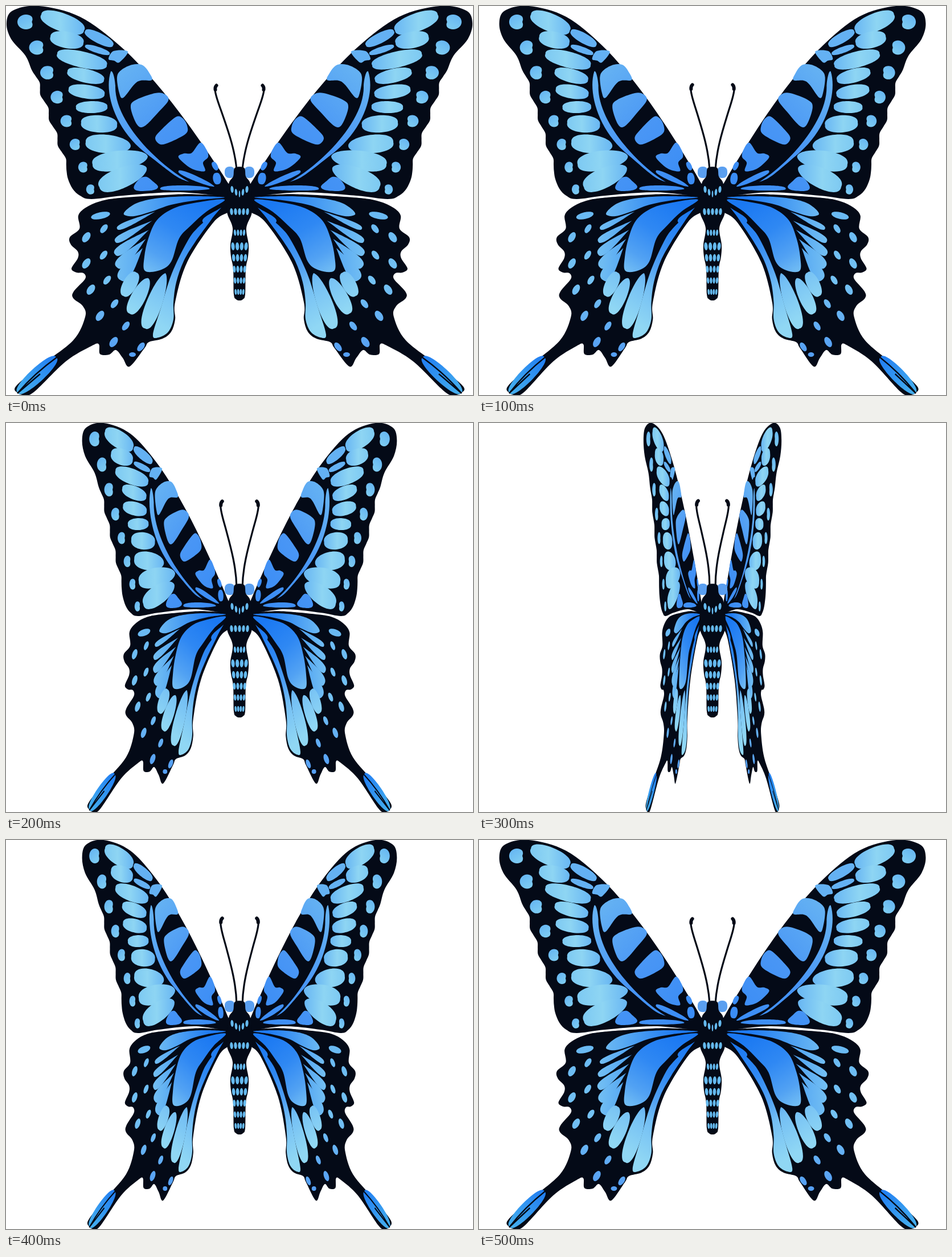
These frames come from a looping animation (820x683 px, 0.6 s). An HTML page:

```html
<!DOCTYPE html>
<html lang="en">
<head>
<meta charset="utf-8">
<title>Butterfly</title>
<style>
  html, body { margin: 0; width: 100%; height: 100%; overflow: hidden; background: #fff; }
  svg { display: block; width: 100%; height: 100%; }
</style>
</head>
<body>
<svg viewBox="0 0 820 683">
  <defs>
    <linearGradient id="pale">
      <stop offset="0" stop-color="#7dc9f2"/>
      <stop offset=".45" stop-color="#8ed5f3"/>
      <stop offset="1" stop-color="#68b6f3"/>
    </linearGradient>
    <linearGradient id="edge" x2=".6" y2="1">
      <stop offset="0" stop-color="#63b3f2"/>
      <stop offset="1" stop-color="#7dcbf2"/>
    </linearGradient>
    <linearGradient id="inner" gradientUnits="userSpaceOnUse" x1="375" y1="300" x2="205" y2="115">
      <stop offset="0" stop-color="#3a8cf5"/>
      <stop offset=".5" stop-color="#4996f5"/>
      <stop offset="1" stop-color="#64b1f3"/>
    </linearGradient>
    <linearGradient id="fan" gradientUnits="userSpaceOnUse" x1="350" y1="345" x2="235" y2="540">
      <stop offset="0" stop-color="#1a78f2"/>
      <stop offset=".3" stop-color="#2f88f3"/>
      <stop offset=".54" stop-color="#52a2f3"/>
      <stop offset=".7" stop-color="#74bff4"/>
      <stop offset="1" stop-color="#90d7f4"/>
    </linearGradient>
    <linearGradient id="brow" gradientUnits="userSpaceOnUse" x1="190" y1="0" x2="340" y2="0">
      <stop offset="0" stop-color="#74c0f3"/>
      <stop offset="1" stop-color="#1f7bf2"/>
    </linearGradient>
    <linearGradient id="spot" gradientUnits="userSpaceOnUse" x1="0" y1="360" x2="0" y2="610">
      <stop offset="0" stop-color="#69b9f3"/>
      <stop offset=".5" stop-color="#74c2f3"/>
      <stop offset="1" stop-color="#559ff4"/>
    </linearGradient>
    <linearGradient id="tail" x1="1" y1="0" x2="0" y2="1">
      <stop offset="0" stop-color="#1f7bf2"/>
      <stop offset="1" stop-color="#47b2ee"/>
    </linearGradient>
  </defs>
  <g id="half">
    <g class="wing" id="hind"></g>
    <g class="wing" id="fore"></g>
    <g id="antenna" fill="none" stroke="#040a17" stroke-linecap="round">
      <path stroke-width="3.2" d="M405 287C402 254 391 222 382 196C374 172 367 157 367 146"/>
      <path stroke-width="6" d="M367.5 147C367 143 368 141 369.5 139.5"/>
    </g>
    <rect x="384" y="282" width="18" height="20" rx="8" fill="#5a9ff0"/>
  </g>
  <use href="#half" transform="translate(820) scale(-1 1)"/>
  <g id="body"></g>
</svg>
<script>
const INK = '#040a17';
const $ = id => document.getElementById(id);
const times = (n, f) => Array.from({ length: n }, (_, i) => f(i));

function add(parent, tag, attrs) {
  const el = document.createElementNS('http://www.w3.org/2000/svg', tag);
  for (const k in attrs) el.setAttribute(k, attrs[k]);
  return parent.appendChild(el);
}

const points = text => text.trim().split(/\s*,\s*/).map(p => p.split(/\s+/).map(Number));

// Closed smooth curve through key points
function smooth(p) {
  const at = i => p[(i + p.length) % p.length];
  let d = 'M' + p[0];
  p.forEach((b, i) => {
    const a = at(i - 1), c = at(i + 1), e = at(i + 2);
    const h1 = b.map((v, k) => v + (c[k] - a[k]) / 6);
    const h2 = c.map((v, k) => v - (e[k] - b[k]) / 6);
    d += `C${h1} ${h2} ${c}`;
  });
  return d + 'Z';
}

// Rounded cell from one end to the other; end = 0 makes the far end pointed
function eggPath(x1, y1, x2, y2, w, end = 1, bend = 0) {
  const dx = x2 - x1, dy = y2 - y1, len = Math.hypot(dx, dy);
  const at = (u, v) => [x1 + dx * u - dy / len * v, y1 + dy * u + dx / len * v];
  const h = w * (1.1 - .43 * end), far = .5 + .58 * end;
  return `M${at(0, 0)}C${at(-.08 * end, bend - h)} ${at(far, bend - h * end)} ${at(1, 0)}` +
    `C${at(far, bend + h * end)} ${at(-.08 * end, bend + h)} ${at(0, 0)}Z`;
}

function brush(group, fill) {
  const path = d => add(group, 'path', { d, fill });
  return {
    path,
    shape: text => path(smooth(points(text))),
    egg: (...a) => path(eggPath(...a)),
    oval: (cx, cy, rx, ry, rot = 0) =>
      add(group, 'ellipse', { cx, cy, rx, ry, fill, transform: `rotate(${rot} ${cx} ${cy})` })
  };
}

// Round spot with a dent on its right side
const dented = (x, y, rx, ry) => smooth(times(16, i => {
  const a = (i - 8) * Math.PI / 8, r = 1 - .3 * Math.exp(-4 * a * a);
  return [x + rx * r * Math.cos(a), y + ry * r * Math.sin(a)];
}));

function drawFore() {
  const g = $('fore');
  const scallops = times(17, i => {
    const y = 290 - 11.125 * i, wave = 1 - Math.cos((y - 112) / 44.5 * 2 * Math.PI);
    return [45 + .345 * (y - 112) + 3.2 * wave, y];
  });
  brush(g, INK).path(smooth([
    ...points(`1 30, 12 8, 58 0, 130 19, 200 70, 262 134, 318 205, 370 280, 390 311, 400 325, 392 334,
      300 327, 205 333, 150 339, 130 333, 117 321, 109 304`),
    ...scallops, ...points('34 87, 9 58')
  ]));

  const edge = brush(g, 'url(#edge)');
  times(8, i => edge.path(dented(35 + 20.1 * i - .55 * i * i, 28 + 45.5 * i - .5 * i * i, 15 - i, 13 - .6 * i)));

  const pale = brush(g, 'url(#pale)');
  pale.egg(62, 15, 137, 43, 32);
  pale.egg(78, 54, 136, 65, 29);
  pale.egg(90, 84, 177, 104, 28);
  pale.egg(108, 115, 172, 130, 24);
  pale.egg(110, 146, 173, 155, 24);
  pale.egg(123, 178, 178, 177, 21);
  pale.egg(132, 205, 195, 209, 30);
  pale.egg(140, 239, 219, 246, 32, .85);
  pale.egg(152, 278, 249, 264, 34, .8);
  pale.egg(164, 318, 247, 284, 35, .8);

  const inner = brush(g, 'url(#inner)');
  inner.path('M184 115C172 150 190 215 245 258S300 302 322 309C262 275 190 200 192 140C191 125 187 112 184 115Z');
  inner.shape('225 316, 235 303, 247 300, 258 308, 267 317, 260 323, 240 325, 227 323');
  inner.egg(271, 321, 358, 321, 9, .8, -2);
  inner.egg(303, 290, 366, 317, 9, .7);
  inner.egg(363, 274, 371, 288, 9);
  inner.egg(369, 293, 372, 313, 14);
  inner.shape('195 125, 203 112, 222 103, 240 104, 252 118, 256 130, 236 131, 225 138, 206 161, 199 153');
  inner.shape('219 178, 228 165, 262 153, 279 155, 285 166, 268 186, 243 211, 230 208');
  inner.shape('262 232, 272 218, 298 195, 310 197, 318 210, 316 224, 288 239, 271 243');
  inner.shape('303 266, 312 259, 326 258, 341 240, 352 252, 355 265, 346 275, 349 290, 325 285');
  inner.egg(139, 44, 188, 69, 18);
  inner.egg(139, 70, 182, 84, 11);
  inner.shape('180 93, 189 79, 214 80, 199 99, 190 96');
}

function drawHind() {
  const g = $('hind');
  brush(g, INK).shape(`400 335, 345 331, 295 331, 200 337, 165 343, 140 354, 127 368, 129 391, 112 406,
    114 419, 126 431, 126 443, 115 461, 124 468, 136 469, 139 479, 119 501, 118 513, 135 527, 139 546,
    118 587, 60 632, 18 667, 20 679, 32 683, 50 677, 105 624, 150 597, 163 594, 165 611, 181 612,
    193 604, 205 618, 217 633, 243 601, 251 590, 275 584, 290 572, 297 550, 297 520, 318 450, 365 379, 396 358`);

  brush(g, 'url(#brow)').shape('207 366, 215 355, 235 344, 270 337, 325 334, 384 336, 335 341, 290 349, 255 361, 225 369');

  const fan = brush(g, 'url(#fan)');
  fan.shape(`384 340, 335 345, 295 355, 265 376, 250 408, 243 440, 244 465, 270 464, 290 449,
    304 408, 325 385, 352 361`);
  const vein = brush(g, 'url(#brow)');
  times(5, i => vein.egg(195 - 5 * i + 1.6 * i * i, 391 + 22.5 * i, 262 - 5.5 * i, 361 + 16 * i, 10 + 3 * i, .25));
  fan.egg(206, 509, 229, 468, 24);
  fan.egg(217, 540, 250, 478, 25, .8);
  fan.egg(244, 566, 280, 469, 27, .7);
  fan.shape(`258 577, 272 530, 291 470, 317 416, 335 391, 366 366, 333 413, 312 448, 299 485,
    294 520, 294 550, 285 572, 268 582`);
  fan.egg(346, 380, 378, 354, 10, .2);

  const spot = brush(g, 'url(#spot)');
  times(5, i => spot.oval(141 - 4 * i + 4 * i * i, 406 + 46 * i, 6, 10, 35));
  times(6, i => spot.oval(172 - 4 * i + 3.4 * i * i, 391 + 47.5 * i - 1.2 * i * i, 5, 9, 38));
  spot.oval(166, 368, 17, 6, -12);
  spot.oval(222, 612, 6, 4);

  brush(g, 'url(#tail)').egg(21, 679, 88, 617, 25);
  add(g, 'path', { d: 'M20 680Q50 645 89 617M20 680L60 646', stroke: INK, 'stroke-width': 2.5, fill: 'none' });
}

function drawBody() {
  const g = $('body');
  const left = points(`402 284, 399 299, 392 309, 389 325, 387 348, 389 366, 398 390, 394 419, 395 440,
    399 462, 400 506, 404 515`);
  const right = left.map(([x, y]) => [820 - x, y]).reverse();
  brush(g, INK).path(smooth([...left, [410, 517], ...right]));

  const light = brush(g, '#65baf0');
  const row = (y, span, count, rx, ry) => times(count, i => {
    const side = 2 * i / (count - 1) - 1;
    light.oval(410 + side * span, y, rx, ry, side * 5);
  });
  row(322, 13, 2, 2.6, 6);
  row(327, 6, 2, 2.2, 6);
  light.oval(410, 330, 1.3, 6);
  row(361, 14, 5, 2.7, 6);
  row(398, 8, 4, 2.1, 5.5);
  times(5, i => row(422 + 20 * i, 11.5 - 1.2 * i, 4, 3.1 - .3 * i, 7 - .5 * i));
}

drawHind();
drawFore();
drawBody();

const HINGE = 390, STEP = 100, LOOP = 600;
const spread = [1, .911, .659, .26];
const wings = document.querySelectorAll('.wing');

// The wings close in three steps and open again
function draw(now) {
  const step = Math.floor(now % LOOP / STEP), fold = Math.min(step, 6 - step), s = spread[fold];
  wings.forEach(w => w.setAttribute('transform', `translate(${HINGE * (1 - s)}) scale(${s} 1)`));
  $('antenna').setAttribute('transform', `rotate(${2 * fold} 405 285)`);
}

function tick(now) {
  draw(now);
  requestAnimationFrame(tick);
}
draw(0);
requestAnimationFrame(tick);
</script>
</body>
</html>
```
